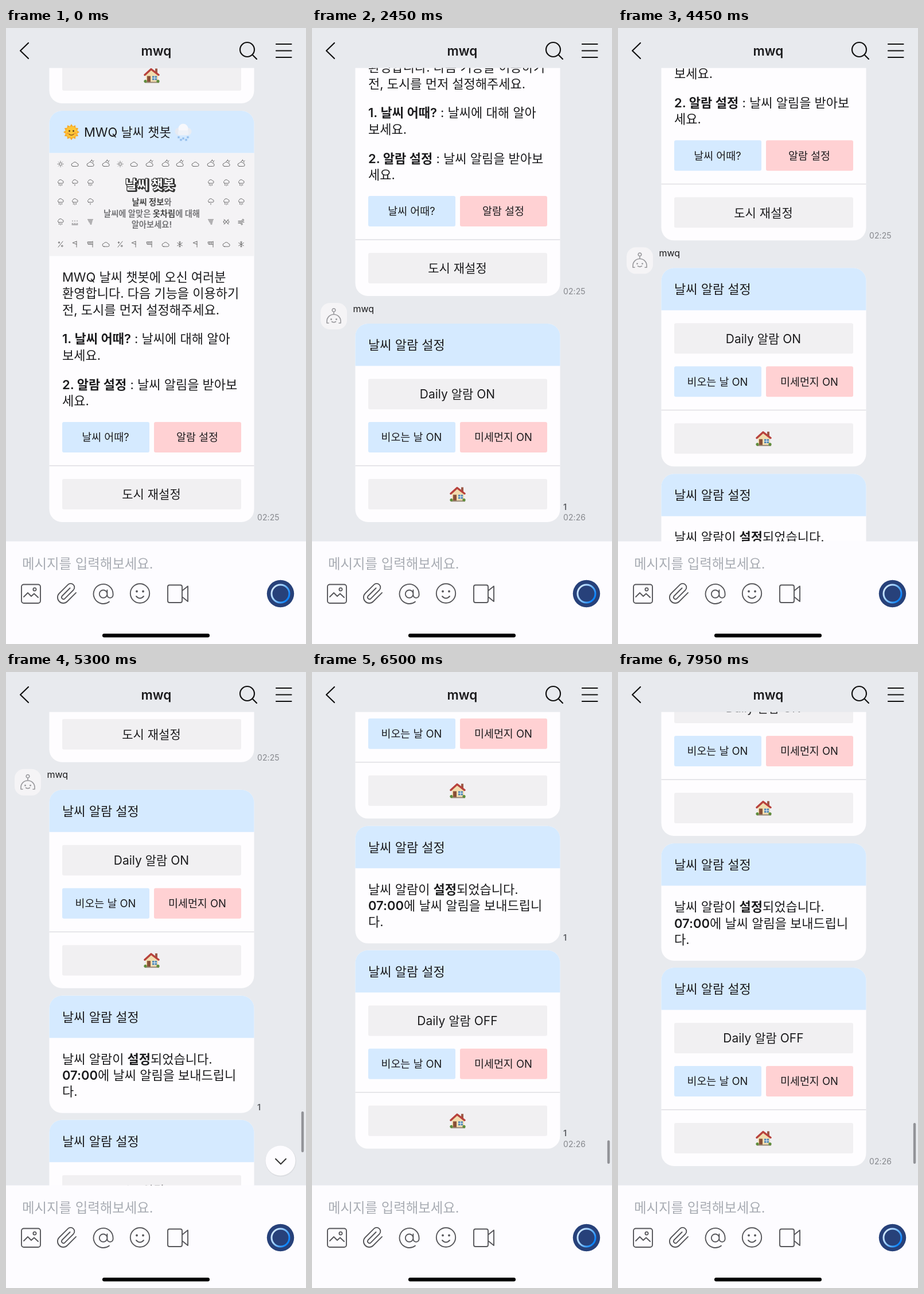
An HTML page for the animation above (8 s loop, 523 by 1071 pixels).

```html
<!DOCTYPE html>
<html lang="ko">
<head>
<meta charset="utf-8">
<title>Chat</title>
<style>
html, body { margin: 0; width: 100%; height: 100%; overflow: hidden; background: #e8eaee; }
svg { display: block; width: 100%; height: 100%; }
text { font-family: Inter, 'Noto Sans CJK KR', 'Noto Sans CJK', sans-serif; fill: #1b1b1d; white-space: pre; }
.b { font-weight: 600; }
.line { fill: none; stroke-linecap: round; stroke-linejoin: round; }
</style>
</head>
<body>
<svg id="stage" viewBox="0 0 523 1071" xmlns="http://www.w3.org/2000/svg"></svg>
<script>
const INK = '#1b1b1d', WHITE = '#fefdff', BLUE = '#d5eaff', PINK = '#ffd1d3', GREY = '#f1f0f2';
const LOOP = 8000;

const rect = (x, y, w, h, fill, r = 0) => `<rect x="${x}" y="${y}" width="${w}" height="${h}" rx="${r}" fill="${fill}"/>`;
const disc = (x, y, r, fill) => `<circle cx="${x}" cy="${y}" r="${r}" fill="${fill}"/>`;
const line = (d, w = 2, color = '#57575b') => `<path class="line" d="${d}" stroke="${color}" stroke-width="${w}"/>`;
const ring = (x, y, r) => `M${x - r} ${y}a${r} ${r} 0 1 0 ${2 * r} 0a${r} ${r} 0 1 0 ${-2 * r} 0`;
const text = (x, y, s, size = 22, attrs = '') => `<text x="${x}" y="${y}" font-size="${size}" ${attrs}>${s}</text>`;
const mid = (x, y, s, size, attrs = '') => text(x, y, s, size, 'text-anchor="middle" ' + attrs);
const bold = s => `<tspan class="b">${s}</tspan>`;
const at = (x, y, body, scale = 1) => `<g transform="translate(${x} ${y}) scale(${scale})">${body}</g>`;
const group = (id, body) => `<g id="${id}">${body}</g>`;

// emoji
const house = (x, y) => at(x, y,
  rect(6, -12, 4, 9, '#9c5a48') +
  '<path d="M-10 12V-2L0-11 11-2V12Z" fill="#f2dcae"/>' +
  line('M-12-1L-1-11 12-1', 3.4, '#b8423d') +
  rect(-8, 1, 6, 11, '#8a5138') + rect(1, 1, 8, 7, '#4d87b5') +
  line('M5 1V8M1 4.5H9', .9, '#fff') + rect(-12, 11, 25, 2, '#9a8a78') +
  disc(-11, 10, 2.6, '#5f8d3e') + disc(11, 10, 2.6, '#5f8d3e'));

let rays = '';
for (let i = 0; i < 12; i++)
  rays += `<path d="M-3.5-9L0-14 3.5-9Z" fill="#f7a928" transform="rotate(${i * 30})"/>`;
const sunFace = at(114, 181, rays + disc(0, 0, 10, '#fdc636') + disc(-3.5, -2, 1.5, '#5b3a1c') +
  disc(3.5, -2, 1.5, '#5b3a1c') + line('M-4 3.5Q0 7 4 3.5', 1.4, '#8d5520') +
  disc(-6.5, 2, 1.6, '#f79a3c') + disc(6.5, 2, 1.6, '#f79a3c'));
const flake = 'M-2.5 0H2.5M-1.3-2.2L1.3 2.2M1.3-2.2L-1.3 2.2';
const snowCloud = at(309, 181,
  disc(-8, -1, 6.5, '#e6eaf2') + disc(8, -1, 6.5, '#e9edf4') + disc(0, -6, 8.5, '#f7f8fc') + rect(-9, -3, 18, 8.5, '#eff2f8', 3) +
  [[-8, 9], [0, 11], [8, 9], [-4, 13.5], [5, 13.5]].map(p => at(...p, line(flake, 1, '#7fb0e8'), .8)).join(''));

// miniature weather glyphs for the banner
const cloudPath = 'M-3 4H3.5a2.5 2.5 0 0 0 .3-5A4 4 0 0 0-3.4-1.4 2.7 2.7 0 0 0-3 4Z';
const lowSun = 'M0-4.5a2.5 2.5 0 0 1 4.8 1.8M2.4-6.5V-7.5M5.5-5.5L6.2-6.2';
const glyphs = {
  s: ring(0, 0, 2.4) + 'M0-5V-4M0 4V5M-5 0H-4M4 0H5M-3.5-3.5L-3-3M3-3L3.5-3.5M-3.5 3.5L-3 3M3 3L3.5 3.5',
  c: cloudPath,
  p: cloudPath + lowSun,
  r: 'M-3 1H3a2.2 2.2 0 0 0 0-4.4A3.5 3.5 0 0 0-3.4-3 2.2 2.2 0 0 0-3 1ZM-2.5 3V4.5M0 3V5.5M2.5 3V4.5',
  q: 'M-3 1H3a2.2 2.2 0 0 0 0-4.4A3.5 3.5 0 0 0-3.4-3 2.2 2.2 0 0 0-3 1ZM0 3V5',
  x: 'M4-5L-4 5M-4-3H-1M-2.5-4.5V-1.5M1.5 3a1.3 1.3 0 1 0 2.6 0a1.3 1.3 0 1 0-2.6 0',
  f: 'M3-5V5M3-5L-4-2.5 3 0',
  w: 'M4-5V5M4-4H-5L-4 0H4M1-4V0M-2-4V0',
  k: 'M0-5V5M-4.3-2.5L4.3 2.5M4.3-2.5L-4.3 2.5M-1.5-4L0-2.8 1.5-4M-1.5 4L0 2.8 1.5 4',
  d: 'M-5 3H-3M-1 3H1M3 3H5M-4-1V-2M0-1V-2M4-1V-2M-5 5H5',
  t: 'M-4.5-4H4.5M-3.5-2H3.5M-2.5 0H3M-1 2H2.5M0 4H2',
  g: ring(-2.7, 0, 2.2) + ring(2.7, 0, 2.2) + 'M-4-4L-2-3M4-4L2-3M-4 4L-2 3M4 4L2 3',
  n: 'M-5-1.5H3a1.5 1.5 0 1 0-1.5-1.5M-5 .5H5M-5 2.5H1a1.3 1.3 0 1 1-1.3 1.3'
};
const cols = [95, 120, 147, 174, 199, 223, 250, 278, 303, 330, 357, 384, 410];
const bannerRows = [[236.5, 'scppscpppcppp'], [269, 'rqr       rrr'], [302, 'rrq       qrr'],
  [337, 'rdt       tgn'], [376, 'xfwcxfwckfwck']];
const banner = rect(75.5, 217.5, 357, 179, '#f4f3f5') +
  bannerRows.map(([y, row]) => [...row].map((k, i) =>
    glyphs[k] ? at(cols[i], y, line(glyphs[k], .85, '#555')) : '').join('')).join('') +
  mid(252.5, 281, '날씨 챗봇', 22, 'font-weight="700" stroke="#333" stroke-width="3.5" stroke-linejoin="round"') +
  mid(251, 279.5, '날씨 챗봇', 22, 'font-weight="700" style="fill:#fff;stroke:#333;stroke-width:2.6;paint-order:stroke;stroke-linejoin:round"') +
  [[307.5, '<tspan fill="#444">날씨 정보</tspan>와'],
   [327.5, '날씨에 알맞은 <tspan fill="#444">옷차림</tspan>에 대해'],
   [347, '알아보세요!']].map(([y, s]) => mid(254, y, s, 14.3, 'font-weight="700" style="fill:#77777a"')).join('');

// chat cards
const card = (y, h, title) => rect(75.5, y, 357, h, WHITE, 22) +
  `<path d="M75.5 ${y + 73.5}V${y + 22}a22 22 0 0 1 22-22H410.5a22 22 0 0 1 22 22V${y + 73.5}Z" fill="${BLUE}"/>` +
  (title ? text(98, y + 45, title) : '');
const wide = (y, label) => rect(98, y, 312, 53, GREY, 3) + (label ? mid(253.5, y + 34.3, label, 21) : house(254, y + 26.5));
const pair = (y, a, b) => rect(98, y, 152, 53, BLUE, 3) + rect(258, y, 152, 53, PINK, 3) +
  mid(173.5, y + 33.3, a, 18.4) + mid(333.5, y + 33.3, b, 18.4);
const foot = (bottom, label) => rect(75.5, bottom - 98.7, 357, 1.5, '#dfdfe3') + wide(bottom - 75, label);
const stamp = (y, s) => text(438, y, s, 14, 'letter-spacing=".1" style="fill:#85878c"');
const unread = (y, id) => group(id, text(438, y, '1', 14.5, 'class="b" style="fill:#5f6166"'));

const TITLE = '날씨 알람 설정';
const alarmCard = (y, label) => card(y, 345, TITLE) + wide(y + 96, label) +
  pair(y + 171, '비오는 날 ON', '미세먼지 ON') + foot(y + 345);

const welcome = rect(75.5, -150, 357, 281, WHITE, 22) + wide(56) +
  card(144, 715) + sunFace + text(136, 189, 'MWQ 날씨 챗봇') + snowCloud + banner +
  [[441, 'MWQ 날씨 챗봇에 오신 여러분'], [469, '환영합니다. 다음 기능을 이용하기'],
   [497.5, '전, 도시를 먼저 설정해주세요.'], [548, bold('1. 날씨 어때?') + ' : 날씨에 대해 알아'],
   [576.5, '보세요.'], [628, bold('2. 알람 설정') + ' : 날씨 알림을 받아보'], [656, '세요.']]
    .map(([y, s]) => text(98, y, s)).join('') +
  pair(685, '날씨 어때?', '알람 설정') + foot(859, '도시 재설정') + stamp(856, '02:25');

const avatar = rect(15, 478, 46, 46, '#f5f4f6', 16) +
  line(ring(38, 490.5, 2.8) + 'M38 493.5V498M29 513H26V509.5a12 11.5 0 0 1 24 0V513H47M34.5 510.5Q38 513 41.5 510.5', 1.6, '#98989c') +
  disc(33.5, 506.5, 1.4, '#98989c') + disc(42.5, 506.5, 1.4, '#98989c') + text(71.5, 493.5, 'mwq', 16);

const chat = at(0, -393, welcome) +
  group('menu', avatar + alarmCard(514, 'Daily 알람 ON') + unread(837.5, 'menuMark') + group('menuTime', stamp(856, '02:26'))) +
  group('notice', card(872, 204, TITLE) + text(98, 990, '날씨 알람이 ' + bold('설정') + '되었습니다.') +
    text(98, 1018.5, bold('07:00') + '에 날씨 알림을 보내드립니') + text(98, 1046.5, '다.') +
    unread(1071, 'noticeMark') + group('noticeTime', stamp(1073, '02:26'))) +
  group('result', alarmCard(1088, 'Daily 알람 OFF') + unread(1411.5, 'resultMark') + stamp(1430, '02:26'));

const header = rect(0, 0, 523, 69.5, '#e8eaee') + line('M39 26L25 39.5 39 53', 2.2, '#111') +
  mid(262, 48, 'mwq', 22.5, 'class="b"') +
  line(ring(420.5, 37.5, 12.5) + 'M429.5 46.5L437 54', 2.2, '#111') +
  line('M471 28H497.5M471 39.5H497.5M471 51H497.5', 2.2, '#111');

const footer = rect(0, 892.5, 523, 179, '#fdfcff') +
  text(28, 940, '메시지를 입력해보세요.', 23.4, 'style="fill:#a8acb3"') +
  line('M31 967.5H56a4 4 0 0 1 4 4V996a4 4 0 0 1-4 4H31a4 4 0 0 1-4-4V971.5a4 4 0 0 1 4-4ZM31 989L38 982 44 988 49 983.5 56 990' + ring(50, 976, 2.6), 1.9) +
  at(86.7, 963.7, line('M21.4 11l-9.2 9.2a6 6 0 0 1-8.5-8.5l9.2-9.2a4 4 0 0 1 5.7 5.7l-9.2 9.2a2 2 0 0 1-2.8-2.8l8.5-8.5', 1.15), 1.65) +
  at(149.2, 963.6, line(ring(12, 12, 4) + 'M16 8v5a3 3 0 0 0 6 0v-1a10 10 0 1 0-3.9 7.9', 1.1), 1.7) +
  line(ring(233.5, 983, 16.7) + 'M227 988Q233.5 995 240 988', 1.9) + disc(228, 979.5, 1.9, '#57575b') + disc(239, 979.5, 1.9, '#57575b') +
  line('M285 968.5H304a3 3 0 0 1 3 3V996a3 3 0 0 1-3 3H285a3 3 0 0 1-3-3V971.5a3 3 0 0 1 3-3ZM307 978.5L317 970.5V997L307 989', 1.9) +
  disc(478.5, 983.5, 23.7, '#27417a') +
  `<path class="line" d="${ring(478.5, 983.5, 15.5)}" stroke="url(#glow)" stroke-width="3"/>` +
  rect(168, 1053, 187, 6.5, '#000', 3.2);

const jump = group('jump', disc(479, 850.5, 27, 'rgba(0,0,0,.05)') + disc(478.5, 849.5, 26, '#fdfcff') +
  line('M470 846.5L479 855.5 488 846.5', 2, '#333'));

document.getElementById('stage').innerHTML =
  '<defs><linearGradient id="glow" x1="0" y1="0" x2="1" y2=".6"><stop offset="0" stop-color="#e4f1ff"/><stop offset=".45" stop-color="#9fd0ff"/><stop offset="1" stop-color="#0a84ff"/></linearGradient></defs>' +
  rect(0, 0, 523, 1071, '#e8eaee') + group('chat', chat) +
  '<rect id="bar" x="514.8" width="4.4" rx="2.2" fill="#929398"/>' + jump + header + footer;

// scroll position over time: [ms, px], smoothed by a monotone cubic
const keys = [[0, -393], [300, -393], [650, 0], [4300, 0], [4450, 96], [4620, 218], [4900, 218], [5300, 309],
  [5750, 447], [6250, 574], [6600, 608], [6900, 602], [7300, 574], [LOOP, 574]];
const END = 574;
const slope = i => keys[i + 1] && keys[i] ? (keys[i + 1][1] - keys[i][1]) / (keys[i + 1][0] - keys[i][0]) : 0;
const tangent = i => {
  const a = slope(i - 1), b = slope(i);
  return a * b > 0 ? 2 * a * b / (a + b) : 0;
};
function scrollAt(t) {
  let i = 0;
  while (i < keys.length - 2 && t >= keys[i + 1][0]) i++;
  const [t0, a] = keys[i], [t1, b] = keys[i + 1], d = t1 - t0, u = (t - t0) / d, v = 1 - u;
  return v * v * (1 + 2 * u) * a + u * u * (3 - 2 * u) * b + u * v * d * (v * tangent(i) - u * tangent(i + 1));
}

const el = id => document.getElementById(id);
const show = (id, on) => { el(id).style.display = on ? '' : 'none'; };

function draw(t) {
  const y = scrollAt(t), over = Math.max(0, y - END);
  const replied = t >= 4300, done = t >= 4850, read = t >= 7600;
  el('chat').setAttribute('transform', `translate(0 ${-y})`);
  show('menu', t >= 300);
  show('menuMark', t < 3000);
  show('menuTime', !replied);
  show('notice', replied);
  show('noticeMark', !read);
  el('noticeMark').setAttribute('transform', `translate(0 ${done ? 0 : -16.5})`);
  show('noticeTime', !done);
  show('result', done);
  show('resultMark', !read);
  show('jump', t >= 4900 && t < 6050);
  show('bar', t >= 4900);
  el('bar').setAttribute('y', 784 + over + Math.min(0, y - END) * .0755);
  el('bar').setAttribute('height', 71 - over);
}

const start = performance.now();
function tick() {
  draw((performance.now() - start) % LOOP);
  requestAnimationFrame(tick);
}
tick();
</script>
</body>
</html>
```
